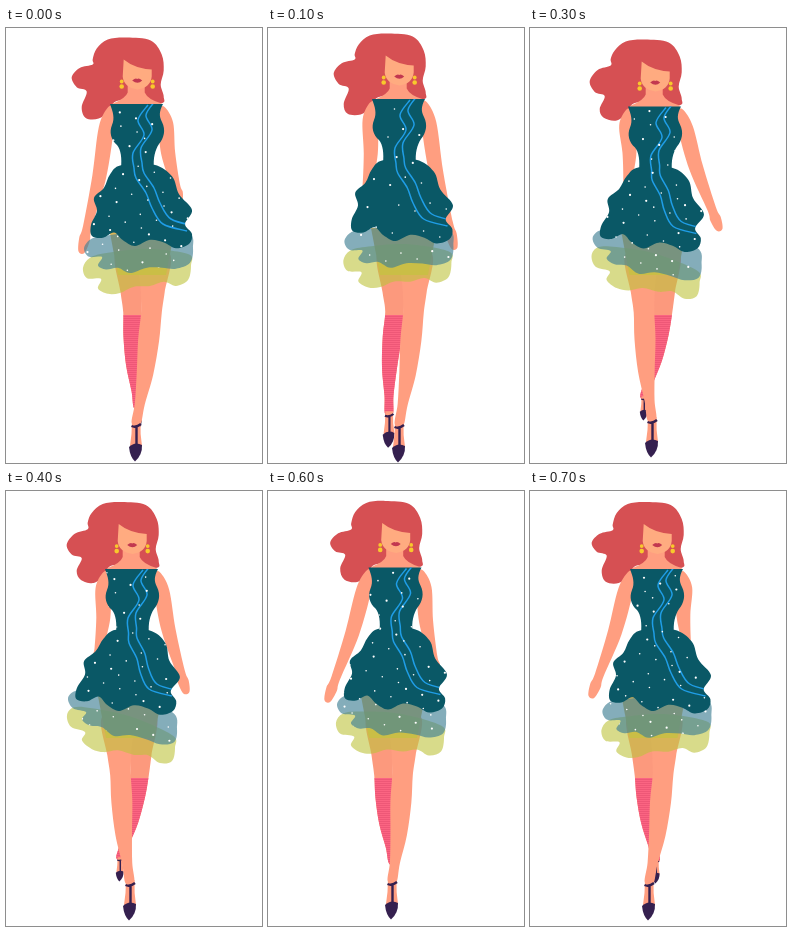
Recreate the animation shown at these times as an HTML page. Size 256x435 px, loop 0.8 s.

```html
<!DOCTYPE html>
<html lang="en">
<head>
<meta charset="utf-8">
<title>Runway walk</title>
<style>
html, body { margin: 0; width: 100%; height: 100%; overflow: hidden; background: #fff; }
svg { display: block; width: 100%; height: 100%; }
.pose { visibility: hidden; animation: show 800ms step-end infinite; }
@keyframes show { 0% { visibility: visible; } 12.5%, 100% { visibility: hidden; } }
.hair { fill: #d65053; }
.skin { fill: #ff9e80; }
.face { fill: #ffab80; }
.thigh { fill: #fc997d; }
.dress { fill: #0a5866; }
.lining { fill: #deb656; }
.blue { fill: #438195; fill-opacity: .65; }
.yellow { fill: #bec33c; fill-opacity: .6; }
.shoe { fill: #35204f; }
.strap { fill: none; stroke: #35204f; stroke-width: 2.4; }
.wave { fill: none; stroke: #1f9de6; stroke-width: 1.5; }
.lips { fill: #c23850; }
.gold { fill: #f8c92c; }
.spark { fill: #fff; }
</style>
</head>
<body>
<svg viewBox="0 0 256 435" preserveAspectRatio="none">
  <defs>
    <pattern id="knit" width="2" height="2" patternUnits="userSpaceOnUse">
      <rect width="2" height="2" fill="#fb6482"/>
      <rect width="2" height="1" fill="#ee5777"/>
    </pattern>
    <g id="head">
      <path class="skin" d="M121 55V66Q119 72 106 77V84H155V77Q141 73 138 66V55Z"/>
      <path class="face" d="M117 33Q128 42 145 43V50Q144 61 131 63Q117 61 116 50Z"/>
      <path class="lips" d="M125.500 54Q129 51 130.500 52.500Q132 51 135.500 54Q131 58.500 125.500 54Z"/>
      <g class="gold">
        <circle cx="115" cy="55" r="1.9"/><circle cx="115" cy="60" r="2.3"/>
        <circle cx="146" cy="55" r="1.9"/><circle cx="146" cy="60" r="2.3"/>
      </g>
    </g>
    <path id="bodice" d="M104 76H157C153 84 153 88 156 94C160 102 158 110 153 116C149 122 147 130 148 141H115C116 130 115 122 111 117C105 112 103 104 106 97C109 90 107 84 104 76Z"/>
    <g id="shoe">
      <path class="skin" d="M-4-3H4.500Q4 10 6 22L0 29L-6 22Q-4 10-4-3Z"/>
      <path class="shoe" d="M-7 23Q-1 17 6 21Q6.500 31-1 37.500Q-6 33-7 23Z"/>
      <path class="strap" d="M-4.500 2Q0 4 5 0M.5 2V21"/>
    </g>
  </defs>
</svg>
<script>
const parse = s => s.split(' ').map(p => p.split(',').map(Number));

// Outlines at rest; the walk bends them.
const hair = parse('120,11 101,13 90,22 86,32 86,38 73,42 65,52 70,62 80,66 75,80 79,90 92,92 103,84 112,74 153,77 157,70 154,58 157,44 155,28 144,14');
const skirt = parse('115,137 104,146 98,159 88,169 91,182 85,196 86,207 97,209 108,204 117,212 129,218 144,212 158,215 170,221 183,217 186,207 179,197 186,183 173,167 166,149 148,137');
const blue = parse('97,203 84,205 78,213 83,222 96,224 92,232 100,237 112,237 124,244 140,241 156,243 170,246 184,242 187,228 182,212 140,204');
const yellow = parse('102,220 84,222 77,231 81,242 95,245 92,254 102,261 114,262 128,258 144,260 158,258 170,264 182,260 185,246 182,234 140,222');
const ribbon = parse('142,77 132,92 138,107 127,125 128,140 130,150 140,165 146,180 157,196 181,203');

// One value per step of the walk
const sway = [0, 0, -7, -6, -5, -3, -3.5, -4];
const drop = [0, -5, 3, 2.5, 2, -1, 0.5, 2];
const hips = [136, 136, 123, 123.5, 124, 126, 125, 123.5];
const handL = parse('76,222 97,178 102,164 97,166 91,172 66,216 60,208 62,204');
const handR = parse('173,172 186,218 193,198 189,200 180,200 174,198 168,182 158,165');
const frontFoot = parse('130,396 131,397 120,392 122,392 124,392 129,390 124,391 119,392');
const backFoot = parse('132,380 121,386 114,371 114,370 114,368 122,385 125,372 126,370');

// Smooth curve through all points
function curve(pts, closed = true) {
  const n = pts.length;
  const at = i => pts[closed ? (i + n) % n : Math.max(0, Math.min(n - 1, i))];
  let d = 'M' + pts[0];
  for (let i = 0; i < (closed ? n : n - 1); i++) {
    const [a, b, c, e] = [at(i - 1), at(i), at(i + 1), at(i + 2)];
    const h1 = b.map((v, j) => v + (c[j] - a[j]) / 6);
    const h2 = c.map((v, j) => v - (e[j] - b[j]) / 6);
    d += `C${h1} ${h2} ${c}`;
  }
  return d + (closed ? 'Z' : '');
}

const mix = (a, b, t) => a.map((v, j) => v + (b[j] - v) * t);

// Outline around a spine of [point, half width]
function limb(spine) {
  const left = [], right = [];
  spine.forEach(([[x, y], w], i) => {
    const a = spine[Math.max(0, i - 1)][0], b = spine[Math.min(spine.length - 1, i + 1)][0];
    const dx = b[0] - a[0], dy = b[1] - a[1], k = w / Math.hypot(dx, dy);
    left.push([x - dy * k, y + dx * k]);
    right.unshift([x + dy * k, y - dx * k]);
  });
  return [...left, ...right];
}

function arm(shoulder, hand, side) {
  const elbow = mix(shoulder, hand, 0.45);
  elbow[0] -= side * 3;
  return limb([
    [[shoulder[0] - side * 3, shoulder[1] - 8], 3], [mix(shoulder, elbow, 0.2), 7.5], [elbow, 7],
    [mix(elbow, hand, 0.68), 4.5], [mix(elbow, hand, 0.85), 5.5], [mix(elbow, hand, 1.03), 3]
  ]);
}

function leg(cx, foot, side, size) {
  const hip = [cx + side * 13, 225], knee = [cx + side * 9.5, 284];
  const shin = (t, bow) => {
    const [x, y] = mix(knee, foot, t);
    return [x + side * bow, y];
  };
  return limb([
    [hip, 15], [mix(hip, knee, 0.65), 12], [knee, 10.3], [shin(0.25, 1), 10.5],
    [shin(0.55, 2), 8.3], [shin(0.82, 1), 5], [foot, 4.3]
  ].map(([p, w]) => [p, w * size]));
}

const shape = (cls, pts) => `<path class="${cls}" d="${curve(pts)}"/>`;
const use = (id, [x, y], s = 1, cls = '') =>
  `<use href="#${id}" class="${cls}" transform="translate(${x} ${y}) scale(${s})"/>`;

function sparks(i) {
  const count = i % 4 === 1 ? 40 : 75;
  let out = '';
  for (let n = 1; n <= count; n++) {
    const u = (n * 0.7549 + i * 0.37) % 1, v = (n * 0.5698 + i * 0.61) % 1;
    out += `<circle cx="${75 + 110 * u}" cy="${80 + 172 * v}" r="${n % 3 ? 0.8 : 1.1}"/>`;
  }
  return out;
}

function draw(i) {
  const beat = Math.cos(i * Math.PI / 4), swing = 5 * beat - 5;
  const side = i >= 2 && i <= 4 ? -1 : 1, planted = i % 4 === 1;
  const torso = [sway[i], drop[i]], head = [sway[i] + 0.7, drop[i] * 0.8 - 1.5];
  const cx = hips[i];

  // Cloth trails the torso more the lower it hangs
  const hang = (pts, tilt) => pts.map(([x, y]) => [
    x + sway[i] + swing * Math.min(1.1, Math.max(0, (y - 137) / 65)),
    y + drop[i] + tilt * beat * (132 - x) / 50
  ]);
  const locks = hair.map(([x, y]) => [
    x + head[0], y + head[1] + (x < 88 ? 1.5 * Math.sin(i * Math.PI / 4 + y / 12) : 0)
  ]);
  const gown = hang(skirt, 1), mid = hang(blue, 7), low = hang(yellow, 8);
  const back = leg(cx, backFoot[i], -side, 0.9);
  const line = curve(hang(ribbon, 0), false);

  return `<g class="pose" style="animation-delay:${(i - 8) * 100}ms">
    <clipPath id="sock${i}"><rect y="287" width="256" height="148"/></clipPath>
    <clipPath id="cloth${i}">
      ${use('bodice', torso)}<path d="${curve(gown)}"/>
    </clipPath>
    <clipPath id="glint${i}">
      ${use('bodice', torso)}<path d="${curve(gown)}"/><path d="${curve(mid)}"/>
    </clipPath>
    ${shape('hair', locks)}
    ${shape('skin', arm([102 + sway[i], 88 + drop[i]], handL[i], -1))}
    ${shape('skin', arm([159 + sway[i], 88 + drop[i]], handR[i], 1))}
    ${use('head', head)}
    ${shape('thigh', back)}
    <g clip-path="url(#sock${i})"><path fill="url(#knit)" d="${curve(back)}"/></g>
    ${use('shoe', backFoot[i], planted ? 0.9 : 0.6)}
    ${shape('skin', leg(cx, frontFoot[i], side, 1))}
    ${use('shoe', frontFoot[i])}
    <path class="lining" d="M${cx - 33} 200H${cx + 33}L${cx + 24} 247H${cx - 24}Z"/>
    ${shape('yellow', low)}${shape('blue', mid)}
    ${shape('dress', gown)}${use('bodice', torso, 1, 'dress')}
    <g clip-path="url(#cloth${i})">
      <path class="wave" d="${line}"/><path class="wave" d="${line}" transform="translate(8 -5)"/>
    </g>
    <g class="spark" clip-path="url(#glint${i})">${sparks(i)}</g>
  </g>`;
}

const art = Array.from({ length: 8 }, (_, i) => draw(i)).join('');
document.querySelector('svg').insertAdjacentHTML('beforeend', art);
</script>
</body>
</html>
```
